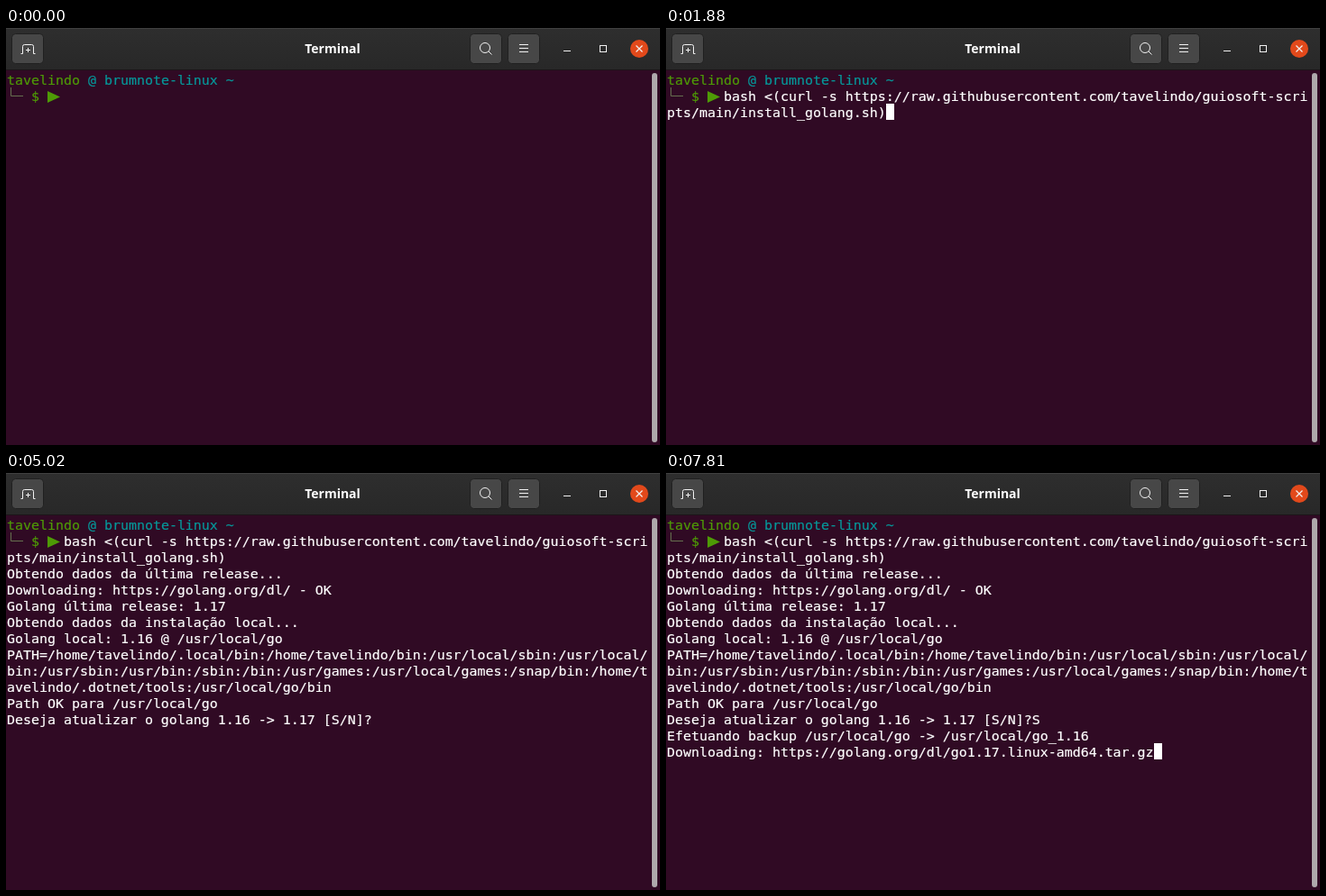
An HTML page that plays this animation: 725 px wide and 463 px high, repeating every 8000 ms.

```html
<!DOCTYPE html>
<html lang="pt">
<head>
<meta charset="utf-8">
<title>Terminal</title>
<style>
  html, body { margin: 0; width: 100%; height: 100%; overflow: hidden; background: #300a24; }
  svg, pre, #cursor { position: absolute; }
  svg { left: 0; top: 0; }
  pre {
    margin: 0; left: 1px; top: 49px; color: #fff;
    font: 14.95px/18px "DejaVu Sans Mono", monospace;
    font-variant-ligatures: none;
    -webkit-text-stroke: .2px;
  }
  .user { color: #4e9a06; }
  .host { color: #06989a; }
  #cursor { width: 9px; height: 18px; background: #fff; }
</style>
</head>
<body>
<svg width="725" height="463" viewBox="0 0 725 463">
  <defs>
    <linearGradient id="bar" x2="0" y2="1">
      <stop stop-color="#2e2e2e"/><stop offset="1" stop-color="#282828"/>
    </linearGradient>
    <rect id="button" x=".5" y="6.5" width="35" height="33" rx="4" fill="#474747" stroke="#202020"/>
  </defs>
  <rect width="725" height="46" fill="url(#bar)"/>
  <rect width="725" height="1" fill="#404040"/>
  <rect y="46" width="725" height="1" fill="#1c1519"/>
  <use href="#button" x="6"/>
  <use href="#button" x="514"/>
  <use href="#button" x="556"/>
  <text x="362" y="28" text-anchor="middle" fill="#fff"
        font-family="Open Sans, Noto Sans, sans-serif" font-weight="700" font-size="14">Terminal</text>
  <circle cx="702" cy="23" r="10" fill="#e2491b"/>
  <g fill="none" stroke="#f2f2f2">
    <path d="M16.5 28.5h2v-8q0-2 2-2h8q2 0 2 2v8h2M22 24.5h5M24.5 22v5"/>
    <circle cx="531" cy="22" r="5.5"/>
    <path d="M535 26l3.5 3.5M569 18.5h10M569 22.5h10M569 26.5h10M618 25.5h8"/>
    <rect x="658.5" y="19.5" width="7" height="7"/>
    <path d="M698.5 19.5l7 7m0-7l-7 7" stroke-width="1.2"/>
  </g>
  <path d="M5.5 66v9.5H19" fill="none" stroke="#66704f"/>
  <path d="M46 70l14 6.5l-14 6.5z" fill="#4e9a06"/>
  <rect x="716" y="50" width="6" height="410" rx="3" fill="#aea9ac"/>
</svg>
<pre><span class="user">tavelindo</span> <span class="host">@ brumnote-linux ~</span>
<span class="user">   $</span></pre>
<pre id="screen"></pre>
<div id="cursor"></div>
<script>
const COLS = 79, CELL_W = 9, CELL_H = 18, LEFT = 1, TOP = 48, LOOP = 8000;
const screenEl = document.getElementById('screen');
const cursorEl = document.getElementById('cursor');

const home = '/home/tavelindo';
const prompt = '\n' + ' '.repeat(7);
const typed = prompt + 'bash ';
const command = typed +
  '<(curl -s https://raw.githubusercontent.com/tavelindo/guiosoft-scripts/main/install_golang.sh)';
const fetching = command + `
Obtendo dados da última release...
Downloading: https://golang.org/dl/`;
const question = fetching + ` - OK
Golang última release: 1.17
Obtendo dados da instalação local...
Golang local: 1.16 @ /usr/local/go
PATH=${home}/.local/bin:${home}/bin:/usr/local/sbin:/usr/local/bin:/usr/sbin:/usr/bin:/sbin:/bin:/usr/games:/usr/local/games:/snap/bin:${home}/.dotnet/tools:/usr/local/go/bin
Path OK para /usr/local/go
Deseja atualizar o golang 1.16 -> 1.17 [S/N]?`;
const backup = question + `S
Efetuando backup /usr/local/go -> /usr/local/go_1.16
Downloading: https://golang.org/dl/go1.17.linux-amd64.tar.gz`;

// [start ms, terminal text, cursor visible]
const steps = [
  [0, prompt, false], [80, prompt, true], [960, prompt, false], [1180, prompt, true],
  [1580, typed, true], [1880, command, true],
  [3380, fetching, true], [3840, fetching, false], [4430, fetching, true],
  [5020, question, false], [5930, question, true], [6230, question, false],
  [7020, question, true], [7400, question, false],
  [7810, backup, true],
];

const wrap = text => text.split('\n')
  .flatMap(line => line.match(new RegExp(`.{1,${COLS}}`, 'g')) || ['']);

let shown;
function draw(now) {
  const t = now % LOOP;
  const step = steps.findLast(([start]) => start <= t);
  if (step !== shown) {
    shown = step;
    const [, text, on] = step;
    const lines = wrap(text);
    const row = lines.length - 1;
    screenEl.textContent = lines.join('\n');
    cursorEl.style.left = LEFT + lines[row].length * CELL_W + 'px';
    cursorEl.style.top = TOP + row * CELL_H + 'px';
    cursorEl.hidden = !on;
  }
  requestAnimationFrame(() => draw(performance.now()));
}
draw(performance.now());
</script>
</body>
</html>
```
